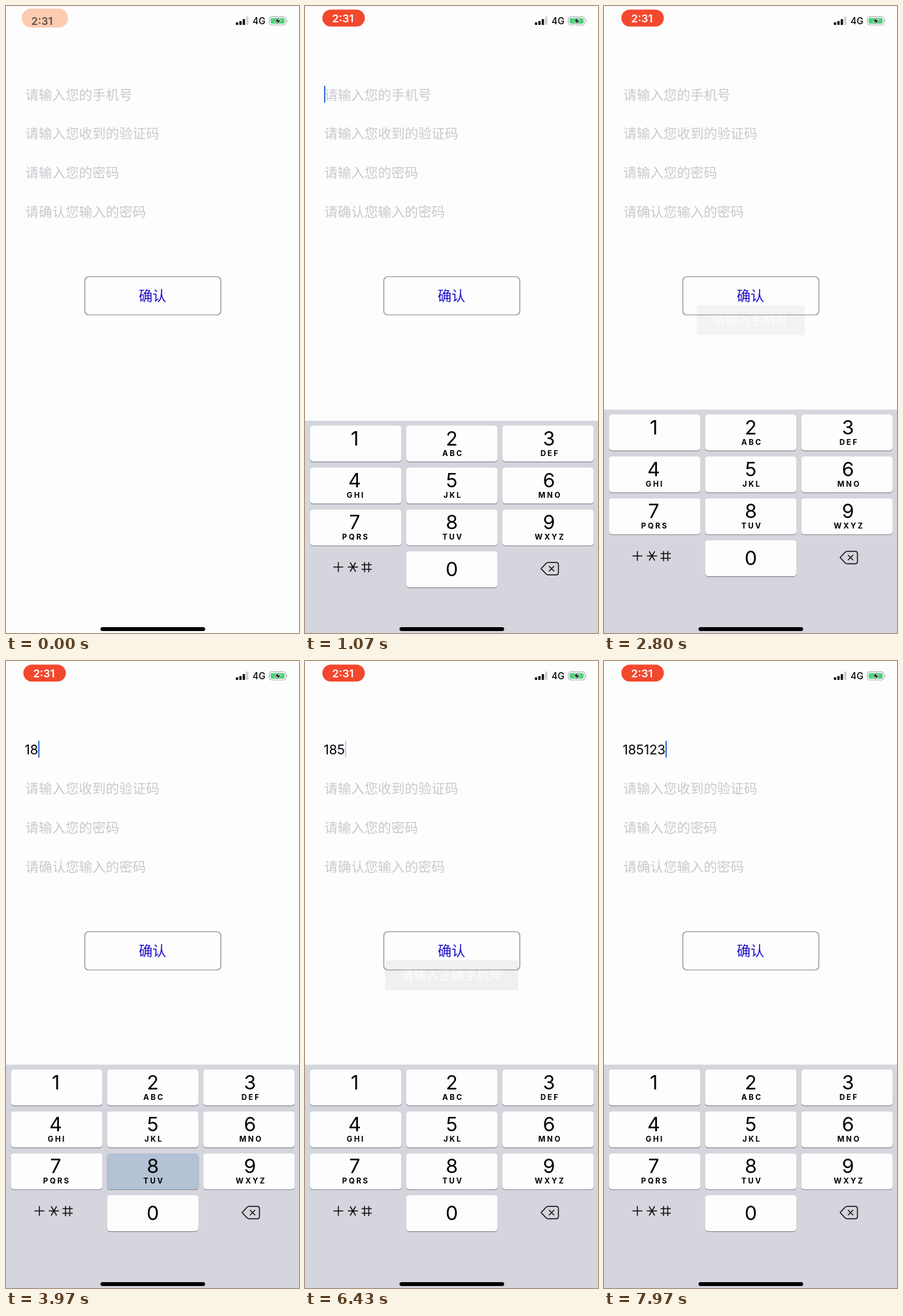
An HTML page for the animation above (8000 ms loop, 448 px wide and 960 px high).

```html
<!DOCTYPE html>
<html lang="zh">
<head>
<meta charset="utf-8">
<style>
  html, body { margin: 0; width: 100%; height: 100%; overflow: hidden; background: #fdfdfe; }
  svg { display: block; width: 448px; height: 960px; font-family: Inter, Roboto, sans-serif; }
  .cjk { font-family: "Noto Sans CJK SC", "Noto Sans CJK", sans-serif; }
  .hint { font-size: 20.5px; font-weight: 300; fill: #cbc8cd; }
  .mid { text-anchor: middle; }
  .digit { font-size: 30px; }
  .letters { font-size: 11.5px; font-weight: 700; letter-spacing: 2.6px; }
  .clock { font-size: 16.5px; font-weight: 600; }
  .line { fill: none; stroke: #111; stroke-width: 1.5; }
</style>
</head>
<body>
<svg viewBox="0 0 448 960">
  <rect width="448" height="960" fill="#fdfdfe"/>

  <rect id="pill"/>
  <text id="clockPlain" class="clock" x="38.5" y="29" fill="#111">2:31</text>
  <text id="clockPill" class="clock" x="41.5" y="24.5" fill="#fff">2:31</text>

  <g id="bars"></g>
  <text x="377" y="28" font-size="14" font-weight="500">4G</text>
  <rect x="402.5" y="16.5" width="25.5" height="12.5" rx="3.5" fill="#fff" stroke="#a5a5a8"/>
  <rect x="404.5" y="18.5" width="21.5" height="8.5" rx="2" fill="#4cd07a"/>
  <path d="M429.5 20.5q2 2 0 4.5z" fill="#a5a5a8"/>
  <path d="M418 16.5l-7.5 7.5h4.5l-2 5.5 7.5-8h-4.5z" fill="#111" stroke="#fff" stroke-width=".8"/>

  <g id="hints" class="cjk hint"></g>
  <text id="typed" x="28.5" y="143" font-size="20.1"></text>
  <rect id="caret" y="122" width="2.2" height="26" rx="1" fill="#3b74d8"/>

  <rect x="120.5" y="414.5" width="208" height="58.5" rx="6" fill="none" stroke="#878589" stroke-width="1.2"/>
  <text class="cjk mid" x="224" y="451" font-size="21" fill="#1a0cc8">确认</text>

  <g id="toast">
    <rect id="toastBox" y="458" height="46" rx="3" fill="#000" fill-opacity=".64"/>
    <text id="toastText" class="cjk mid" x="224" y="488.3" font-size="19.25" fill="#fff"></text>
  </g>

  <g id="keyboard">
    <rect y="618" width="448" height="360" fill="#d5d5dd"/>
    <g id="keys"></g>
    <path class="line" d="M43.5 842h15M51 834.5v15
      M65.5 842h15.5M69 835l8.5 14M77.5 835l-8.5 14
      M86.5 838.5h15.5M86.5 845.5h15.5M91 834.5v15.5M97.5 834.5v15.5"/>
    <path class="line" stroke-linejoin="round" d="M361 844.5l7.5-8q1.5-1.5 3.5-1.5h12q3.5 0 3.5 3.5v12q0 3.5-3.5 3.5h-12q-2 0-3.5-1.5z
      M373 840.5l8 8M381 840.5l-8 8"/>
  </g>
  <rect x="144.500" y="951" width="160" height="6" rx="3" fill="#050505"/>
</svg>
<script>
const LOOP = 8000, FOCUS = 810, PRESS = 110;
const presses = [[3500, 1], [3910, 8], [4450, 5], [7000, 1], [7330, 2], [7650, 3]];
const toasts = [[1580, 2820, '请输入手机号'], [5220, 6455, '请输入正确手机号']];
const $ = id => document.getElementById(id);
const clamp = v => Math.max(0, Math.min(1, v));

function add(parent, tag, attrs, text = '') {
  const el = document.createElementNS('http://www.w3.org/2000/svg', tag);
  set(el, attrs);
  el.textContent = text;
  return parent.appendChild(el);
}
function set(el, attrs) {
  for (const name in attrs) el.setAttribute(name, attrs[name]);
}

[4, 6, 9, 13].forEach((height, i) => add($('bars'), 'rect', {
  x: 351.5 + i * 5.2, y: 29 - height, width: 3.6, height, rx: 0.8, fill: i < 3 ? '#111' : '#d2d0d3'
}));

['请输入您的手机号', '请输入您收到的验证码', '请输入您的密码', '请确认您输入的密码']
  .forEach((label, i) => add($('hints'), 'text', { x: 29.5, y: 143.5 + i * 59.9 }, label));
const phoneHint = $('hints').firstChild;

const letters = ['', '', 'ABC', 'DEF', 'GHI', 'JKL', 'MNO', 'PQRS', 'TUV', 'WXYZ'];
const keys = letters.map((label, digit) => {
  const slot = digit ? digit - 1 : 10, column = slot % 3;
  const x = 7.5 + column * 147, y = 625.5 + Math.floor(slot / 3) * 64.2;
  const textX = 76 + column * 148.5;
  const box = { x, y, width: 140, height: 55, rx: 5 };
  add($('keys'), 'rect', { ...box, y: y + 1.2, fill: '#8c8c92' });
  const face = add($('keys'), 'rect', box);
  add($('keys'), 'text', { class: 'digit mid', x: textX, y: y + (digit ? 30.5 : 37.5) }, digit);
  add($('keys'), 'text', { class: 'letters mid', x: textX + 1.8, y: y + 46.5 }, label);
  return face;
});

function drawClock(t) {
  const p = 1 - (1 - clamp(t / 350)) ** 2;
  const mix = (a, b) => a + (b - a) * p;
  set($('pill'), {
    x: mix(24, 26.5), y: mix(4, 5.5), width: mix(71, 65), height: mix(29, 26), rx: mix(14.5, 13),
    fill: `rgb(${mix(252, 242)},${mix(205, 72)},${mix(178, 46)})`
  });
  set($('clockPlain'), { opacity: 0.65 * (1 - p) });
  set($('clockPill'), { opacity: p });
}

function drawField(t) {
  const done = presses.filter(([at]) => t >= at);
  const value = done.map(([, digit]) => digit).join('');
  $('typed').textContent = value;
  set(phoneHint, { opacity: value ? 0 : 1 });

  // The caret blinks once a second, counted from the latest key.
  const since = t - (done.length ? done[done.length - 1][0] : 890);
  const phase = (since / 1000) % 1;
  const blink = clamp((0.75 - phase) / 0.15) + clamp((phase - 0.95) / 0.1);
  set($('caret'), {
    x: 29 + (value ? $('typed').getComputedTextLength() - 0.5 : 0),
    opacity: t < FOCUS ? 0 : since < 0 ? 1 : clamp(blink)
  });
}

function drawKeyboard(t) {
  const s = Math.max(0, t - FOCUS) * 0.0182;
  set($('keyboard'), { transform: `translate(0 ${342 * (1 + s) * Math.exp(-s)})` });
  keys.forEach((face, digit) => {
    const held = presses.some(([at, d]) => d === digit && t >= at && t < at + PRESS);
    set(face, { fill: held ? '#b3c2d5' : '#fdfdfe' });
  });
}

function drawToast(t) {
  const toast = toasts.find(([from, to]) => t >= from && t < to);
  set($('toast'), { opacity: toast ? clamp((t - toast[0]) / 200) * clamp((toast[1] - t) / 300) : 0 });
  if (!toast) return;
  const width = toast[2].length * 19.25 + 49.5;
  set($('toastBox'), { x: 224.3 - width / 2, width });
  $('toastText').textContent = toast[2];
}

const start = performance.now();
function frame() {
  const t = (performance.now() - start) % LOOP;
  drawClock(t);
  drawField(t);
  drawKeyboard(t);
  drawToast(t);
  requestAnimationFrame(frame);
}
frame();
</script>
</body>
</html>
```
